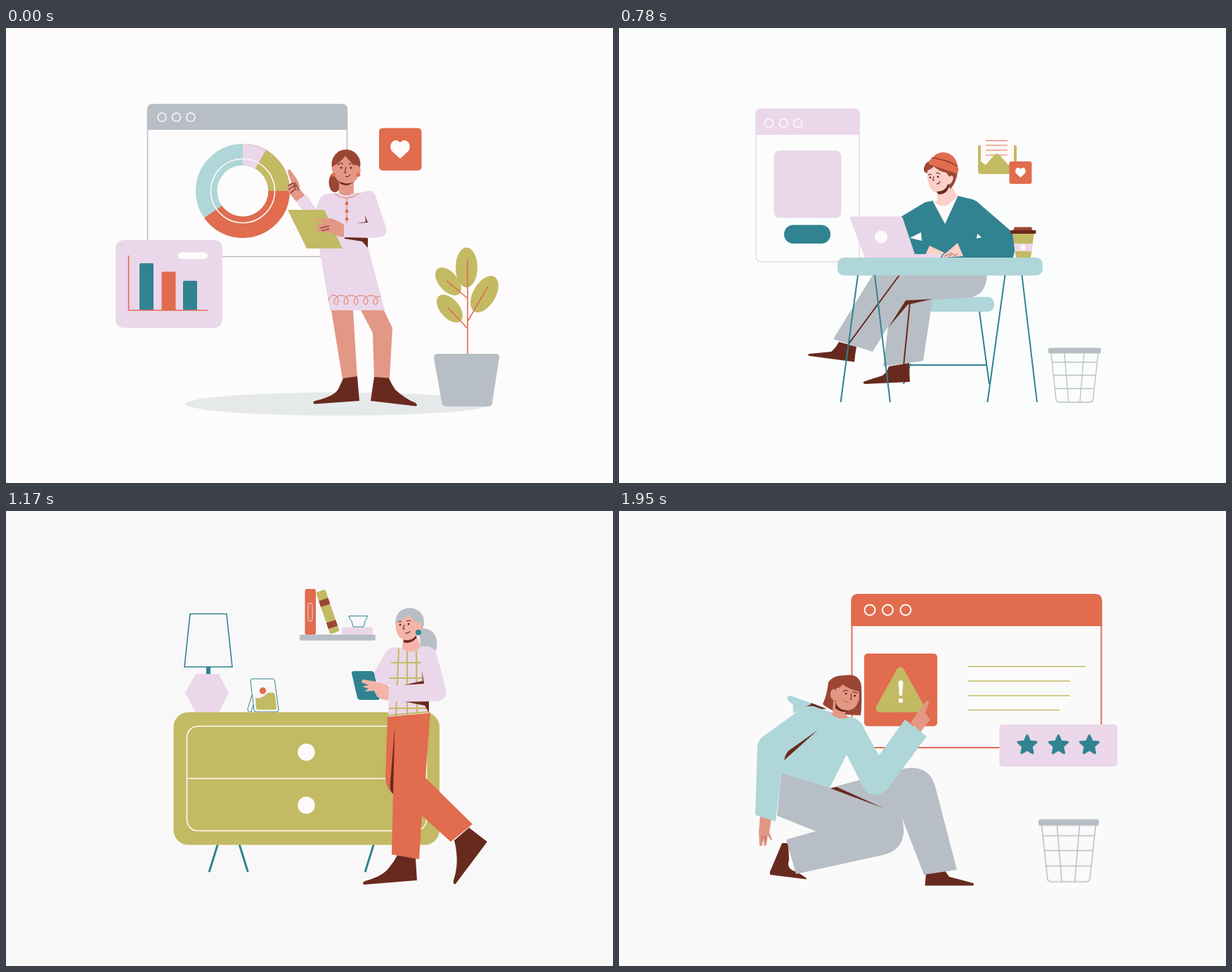
These frames come from a looping animation (864x648 px, 2.34 s). An HTML page:

```html
<!DOCTYPE html>
<html lang="en">
<head>
<meta charset="utf-8">
<title>People at work</title>
<style>
html, body { margin: 0; width: 100%; height: 100%; overflow: hidden; }
svg { display: block; width: 100vw; height: 100vh; animation: paper 2340ms step-end infinite; }
.scene { animation: show 2340ms step-end infinite; }
.s1 { animation-delay: -1950ms; }
.s2 { animation-delay: -1560ms; }
.s3 { animation-delay: -1170ms; }
.s4 { animation-delay: -780ms; }
.s5 { animation-delay: -390ms; }
@keyframes show { 0% { opacity: 1; } 16.666% { opacity: 0; } 100% { opacity: 0; } }
@keyframes paper {
  0% { background: #fdfbfc; }
  33.333% { background: #fbfdfd; }
  44.444% { background: #fdfdfd; }
  50% { background: #f9f8f9; }
  66.666% { background: #fcf8f8; }
  83.333% { background: #fafafa; }
  100% { background: #fdfbfc; }
}
.gray { fill: #b8bec6; } .teal { fill: #318391; } .aqua { fill: #afd6d8; }
.lilac { fill: #ebd7ea; } .coral { fill: #e16c4e; } .olive { fill: #c3ba64; }
.dark { fill: #682a1e; } .hair { fill: #9b4634; } .white { fill: #fefafa; }
.skin { fill: #e39785; } .fair { fill: #fad0c8; } .rose { fill: #f4b5a8; }
.l { fill: none; stroke-width: 1.6; }
.l.gray { stroke: #b8bec6; } .l.teal { stroke: #318391; } .l.aqua { stroke: #afd6d8; }
.l.lilac { stroke: #ebd7ea; } .l.coral { stroke: #e16c4e; } .l.olive { stroke: #c3ba64; }
.l.dark { stroke: #682a1e; stroke-width: 1.1; } .l.white { stroke: #fefafa; }
.l.gray, .l.teal, .l.aqua, .l.lilac, .l.coral, .l.olive, .l.dark, .l.white { fill: none; }
</style>
</head>
<body>
<svg viewBox="0 0 864 648" preserveAspectRatio="none">
<defs>
  <path id="heart" class="white" d="M0 13L-12 2C-16-3-13-13-6.5-13C-3-13-1-11 0-9.5C1-11 3-13 6.5-13C13-13 16-3 12 2Z"/>
  <path id="star" class="teal" stroke="#318391" stroke-width="3.5" stroke-linejoin="round" d="M0-13.5L3.6-5L12.8-4.2L5.9 1.9L7.9 10.9L0 6.2L-7.9 10.9L-5.9 1.9L-12.8-4.2L-3.6-5Z"/>
  <g id="bin">
    <path class="l gray" style="stroke-width:1.3" d="M615 463L622 528Q622 533 627 533H670Q674 533 675 528L682 463M634 463L640 533M662 463L656 533M617 476H680M618 494.5H678M620 513.5H676"/>
    <rect class="gray" x="611" y="455.5" width="75" height="8" rx="2.5"/>
  </g>
  <path id="slacks" d="M453 317L510 312L502 350Q500 364 505 372L554 459L519 477L497 442L493 499L453 492L456 398Q449 385 451 368Z"/>
  <clipPath id="legs"><use href="#slacks"/></clipPath>
</defs>

<g class="scene s0">
  <ellipse cx="474" cy="535.5" rx="219" ry="16.5" fill="#e6e9ea"/>
  <rect class="l gray" x="201.5" y="110" width="284" height="215.5" rx="7"/>
  <path class="gray" d="M201 145V116Q201 108 209 108H478Q486 108 486 116V145Z"/>
  <g class="l white"><circle cx="222" cy="127" r="6"/><circle cx="242.5" cy="127" r="6"/><circle cx="263" cy="127" r="6"/></g>
  <g fill="none" stroke-width="30.5" transform="rotate(-90 337 232)">
    <circle cx="337" cy="232" r="51.7" stroke="#afd6d8"/>
    <circle cx="337" cy="232" r="51.7" stroke="#e16c4e" pathLength="360" stroke-dasharray="235 125"/>
    <circle cx="337" cy="232" r="51.7" stroke="#c3ba64" pathLength="360" stroke-dasharray="90 270"/>
    <circle cx="337" cy="232" r="51.7" stroke="#ebd7ea" pathLength="360" stroke-dasharray="29.5 330.5"/>
  </g>
  <circle class="l white" cx="337" cy="232" r="45.5"/>
  <rect class="lilac" x="156" y="302" width="152" height="125" rx="12"/>
  <rect class="white" x="245" y="319.5" width="42" height="9.5" rx="4.7"/>
  <rect class="teal" x="190" y="335" width="20" height="67" rx="1.5"/>
  <rect class="coral" x="221.5" y="347" width="20" height="55" rx="1.5"/>
  <rect class="teal" x="252" y="360" width="20" height="42" rx="1.5"/>
  <path class="l coral" d="M174.5 324V402H287"/>
  <rect class="coral" x="531" y="142.5" width="60.5" height="60.5" rx="5"/>
  <use href="#heart" x="561" y="173"/>

  <g class="olive">
    <ellipse cx="655.5" cy="341" rx="15.5" ry="28.5"/>
    <ellipse cx="629.5" cy="361" rx="13.5" ry="23.5" transform="rotate(-41 629.5 361)"/>
    <ellipse cx="631.5" cy="399.5" rx="13.5" ry="23.5" transform="rotate(-41 631.5 399.5)"/>
    <ellipse cx="681" cy="379" rx="16" ry="28.6" transform="rotate(30 681 379)"/>
  </g>
  <path class="l coral" d="M657 464V329M657 385L627 360M657 428L629 398M657 418L686 368"/>
  <path class="gray" d="M614 464H697Q703 464 702 470L692 534Q691 539 686 539H627Q621 539 620.5 534L609 470Q609 464 614 464Z"/>

  <path class="skin" d="M463 402H494L500 498L479 500ZM505 402H538L550 427L546 499L524 498L522 434Z"/>
  <path class="dark" d="M480 499L500 496L503 531L439 535.5Q435 533 440 531Q470 524 474 512ZM524 497L545 498.500Q549 508 554 515Q568 528 583 534Q587 538 583 538.5L519 531Z"/>
  <path class="skin" d="M401 202Q404 200 407 205L415 217Q418 222 418 229L426 239L413 247L404 236Q399 231 401 226Q403 222 406 220L401.500 206Z"/>
  <path class="l dark" d="M401 225L409 221L412 226M402 230L410 225L413 231M405 235L411 230M411 220L417 231"/>
  <path class="lilac" d="M413 247L427 237L444 262H424Z"/>
  <ellipse class="hair" cx="468" cy="220" rx="8.500" ry="14"/>
  <path class="lilac" d="M453 237Q461 235 470 235H502L518 231.500Q523 232 526 239L541 284Q543 297 531 298L515 299L516 315L539 402H461L446 314L440 265Q445 240 453 237Z"/>
  <path class="skin" d="M474 214H495V235Q485 242 474 235Z"/>
  <path class="dark" d="M475 216Q485 224 495 215V219Q485 228 475 221Z"/>
  <ellipse class="hair" cx="484" cy="194" rx="20.500" ry="21"/>
  <path class="skin" d="M465 197Q477 191 483 182Q490 193 503 197Q507 204 502 209Q499 221 485 221.500Q470 220 467 208Q462 202 465 197Z"/>
  <g class="coral"><circle cx="466" cy="209" r="2.700"/><circle cx="501.500" cy="209" r="2.700"/><circle cx="485" cy="250" r="2.400"/><circle cx="485" cy="261" r="2.400"/><circle cx="485" cy="272" r="2.400"/></g>
  <path class="l coral" style="stroke-width:1" d="M468 236Q485 249 503 235M485 243V278"/>
  <circle class="dark" cx="477" cy="199" r="1.500"/><circle class="dark" cx="491" cy="199" r="1.500"/>
  <path class="l dark" d="M472 195Q476 191 480 194M488 194Q492 191 496 195M484 198L482 206H485M483 212Q488 212 490 209"/>
  <path class="dark" d="M498 278L512 276L511 267L515 277ZM482 298L515 299V313L507 304L482 300Z"/>
  <path class="olive" d="M401 259H453L479 314H428Z"/>
  <path class="skin" d="M441 273L463 271Q471 274 481 280V298Q468 296 462 291L446 290Q439 288 444 284Q439 282 445 279L456 277L442 275Z"/>
  <path class="l dark" d="M447 285L460 282M449 289L460 286"/>
  <path class="l coral" style="stroke-width:1" d="M459 388c3-11 14-9 14 1c0 6-6 6-6 1c0-3 3-8 8-9c8-1 12 4 12 8c0 6-6 6-6 1c0-3 3-8 8-9c8-1 12 4 12 8c0 6-6 6-6 1c0-3 3-8 8-9c8-1 12 4 12 8c0 6-6 6-6 1c0-3 3-8 8-9c8-1 12 4 12 8c0 6-6 6-6 1c0-5 5-8 10-8"/>
</g>

<g class="scene s1">
  <rect class="l aqua" style="stroke-width:2" x="195.500" y="114" width="365.500" height="224" rx="9"/>
  <path class="aqua" d="M194.500 160V122Q194.500 112 204 112H552Q562 112 562 122V160Z"/>
  <g class="l white" style="stroke-width:2.1"><circle cx="222" cy="136" r="7.600"/><circle cx="248.500" cy="136" r="7.600"/><circle cx="274.500" cy="136" r="7.600"/></g>
  <rect class="aqua" x="213.500" y="199.500" width="107.500" height="107" rx="9"/>
  <path class="teal" d="M408 230.500V287.500H352Q345.500 287.500 345.500 281V237Q345.500 230.500 352 230.500ZM410 230.500H469.500V287.500H410Z"/>
  <path class="lilac" d="M472 230.500H527Q534 230.500 534 237V281Q534 287.500 527 287.500H472Z"/>
  <circle class="olive" cx="206" cy="329" r="34"/>
  <path class="l white" d="M192 331L205 340L223 318"/>
  <path class="olive" d="M652 341C662 343 680 355 680 375C676 390 691 395 691 414C691 425 686 435 683 441H620C617 435 612 425 612 414C612 395 627 390 624 375C624 355 642 343 652 341Z"/>
  <path class="l coral" d="M652 440V367M652 391L639 377M652 411L662 391"/>
  <path class="l coral" style="fill:#fefcfd" d="M615 440.500H688Q692 440.500 691.500 445L683 530Q682 534 678 534H627Q623 534 622 530L611.500 445Q611.500 440.500 615 440.500Z"/>

  <path class="dark" d="M465 494L490 498L492 530L417 535Q414 533 419 530Q450 518 455 510Q460 500 465 494ZM527 476L551 461L572 485L515 532Q511 533 513 527Q532 500 527 476Z"/>
  <use href="#slacks" class="lilac"/>
  <g class="olive" clip-path="url(#legs)">
    <circle cx="467" cy="330" r="18.500"/><circle cx="496" cy="369" r="20.500"/><circle cx="476" cy="419" r="20"/>
    <circle cx="456" cy="396" r="18"/><circle cx="488" cy="443" r="20.500"/><circle cx="530" cy="431" r="20.500"/><circle cx="451" cy="481" r="18.500"/>
    <path d="M503 312H511L506 355H499Z"/>
  </g>
  <path class="skin" d="M419 165Q421 163.500 424 167L433 181Q437 185 437 192L444 201L431 211L425 198Q416 193 418 187Q420 183 424 181L419 168Z"/>
  <path class="l dark" d="M418 189L427 184H433M420 194L428 187L432 190M425 197L430 191L434 199"/>
  <path class="dark" d="M463 230H472L470 300L460 317H451L457 290L455 255ZM485 212L496 208L490 226Z"/>
  <path class="coral" d="M430 211L446 199L468 233L456 257Z"/>
  <path class="skin" d="M491 210L505 203L511 221L488 228Z"/>
  <path class="coral" d="M488 223Q503 224 509 220Q518 225 516 240L507 285L511 311L459 317L471 300Q455 303 449 292Q446 285 450 279L457 268L470 235Z"/>
  <path class="l dark" d="M490 236L462 266M507 261L470 301"/>
  <circle class="hair" cx="519" cy="194" r="14.500"/>
  <path class="skin" d="M479 183Q475 192 476 198L472.500 204L476 206Q476 215 486 216Q496 214 503 207L507 192L490 176Z"/>
  <path class="hair" d="M477 186Q482 167 498 167Q513 168 516 184Q515 203 505 211L506 200Q506 191 499 193Q495 194 495 199Q486 190 484 180Q480 182 477 186Z"/>
  <ellipse class="skin" cx="500.500" cy="199" rx="5.500" ry="6"/>
  <circle class="dark" cx="478" cy="193" r="1.600"/>
  <path class="l dark" d="M476 189Q479 186 482 189M475 211Q479 212 480 209"/>
</g>

<g class="scene s2">
  <rect class="l lilac" x="195" y="116" width="147" height="217" rx="7"/>
  <path class="lilac" d="M194 152V122Q194 114.500 202 114.500H335Q343 114.500 343 122V152Z"/>
  <g class="l white"><circle cx="213.500" cy="135.500" r="6"/><circle cx="234" cy="135.500" r="6"/><circle cx="254.500" cy="135.500" r="6"/></g>
  <rect class="lilac" x="220.500" y="174.500" width="96" height="96" rx="8"/>
  <rect class="teal" x="235" y="280.500" width="66" height="26.500" rx="13"/>
  <rect class="white" x="515" y="149" width="47" height="46" rx="2"/>
  <path class="l coral" style="stroke-width:1" d="M522 160.500H553M522 167H553M522 174H553M522 181H553"/>
  <path class="olive" d="M511 169Q512 166 515 167V190L522 195L534 181Q538 177 542 181L554 195L562 190V167Q566 166 566 169V204Q566 208 562 208H515Q511 208 511 204Z"/>
  <rect class="coral" x="555.500" y="190" width="32" height="32" rx="3"/>
  <use href="#heart" transform="translate(571.5 206) scale(.53)"/>

  <rect class="aqua" x="400" y="383" width="134" height="21" rx="9"/>
  <path class="l teal" style="stroke-width:2" d="M513 404L527 507M414 480H523M415 478L405 507"/>
  <path class="dark" d="M313 447L338 454Q336 465 335 475.500L271 467Q267 465 271 464L302 461Q309 455 313 447ZM384 482L413 477L414 504L350 507Q345 505 350 503L375 495Q382 490 384 482Z"/>
  <path class="gray" d="M362 350H524Q523 382 497 384L446 387L433 474L376 482L383 425L361 461L305 443Z"/>
  <path class="dark" d="M446 386L408 388L383 427L411 394Z"/>
  <path class="l dark" style="stroke-width:2" d="M399 352L326 451M414 392L405 482"/>

  <path class="teal" d="M447 246L464 278L482 239L503 244Q509 246 515 252L560 291Q567 310 561 327H420L405 300L401 269L436 248Z"/>
  <path class="white" d="M414 299L430 291L431 303ZM510 293L516 298L509 300ZM447 247L464 279L482 240Z"/>
  <path class="fair" d="M453 232L472 222L482 240L468 252Q458 256 449 248L453 246Z"/>
  <path class="hair" d="M434 204Q433 192 443 189L482 205Q480 220 472 229L466 222Q448 198 445 203L438 207Z"/>
  <path class="fair" d="M439 203Q446 200 448 197Q455 204 466 206L470 212Q474 208 476 213Q475 221 469 223Q465 234 455 235Q446 235 442 226Q438 215 439 203Z"/>
  <path class="dark" d="M452 233Q465 233 468 222L470 225Q467 237 455 237Z"/>
  <path class="coral" d="M446 185Q452 177 462 177Q480 179 482 198L483 200Q484 204 481 207.500L441 194Q440 189 446 185Z"/>
  <path class="l dark" d="M445 185Q466 187 482 197M440 210Q442 207 445 209M451 207Q454 205 457 208M448 211L447 217H449M452 222Q456 222 457 218"/>
  <circle class="dark" cx="443" cy="213" r="1.400"/><circle class="dark" cx="454" cy="212" r="1.400"/>
  <path class="fair" d="M442 310L463 320L456 327L436 323ZM482 306L490 325L460 327Q460 323 466 320Z"/>
  <path class="l dark" style="stroke-width:.7" d="M463 325L474 320M469 325L477 321M476 325L482 322"/>
  <path class="lilac" d="M332 268.500H400Q403 268.500 404 271L421 322H456Q460 324 458 327H350L329 272Q328 268.500 332 268.500Z"/>
  <circle class="white" cx="373" cy="297.500" r="9"/>
  <rect class="aqua" x="311" y="327" width="292" height="25.500" rx="9"/>
  <path class="l teal" style="stroke-width:2" d="M340 352L315.500 533M364 352L386 533M549.500 352L524.500 533M573.500 352L595 533"/>
  <path class="hair" d="M563 283.500H587L589 289H561Z"/>
  <path class="olive" d="M560 292H591L586 327H565Z"/>
  <path class="lilac" d="M562 307H589L587.500 318H563.500Z"/>
  <circle class="white" cx="575" cy="312.500" r="3.700"/>
  <rect class="dark" x="557" y="288" width="36.500" height="5" rx="1"/>
  <use href="#bin"/>
</g>

<g class="scene s3">
  <path class="l teal" d="M262 146.500H314L322 222H254Z"/>
  <path class="teal" d="M285 222H291V233H285Z"/>
  <path class="lilac" d="M270 232H303L317 259L303 287H270L255 259Z"/>
  <path class="l teal" style="stroke-width:1" d="M351 239H380Q382 239 382.500 242L388 283Q388 286 385 286H356Q353 286 353 283L348 242Q348 239 351 239ZM350 262L344 282Q344 287 349 286L352 276"/>
  <circle class="coral" cx="365.500" cy="256" r="4.700"/>
  <path class="olive" d="M355 266Q361 268 368 263Q372 257 381 259Q383 259 384 270L385 280Q385 283 382 283H359Q356 283 356 280Z"/>
  <rect class="coral" x="425.500" y="111" width="15.500" height="65" rx="3"/>
  <rect class="l lilac" style="stroke-width:1" x="430" y="131" width="6" height="26" rx="3"/>
  <g transform="translate(441 116) rotate(-19)">
    <rect class="olive" width="14" height="63" rx="2.500"/>
    <path class="hair" d="M0 13H14V22H0ZM0 46H14V55H0Z"/>
  </g>
  <rect class="lilac" x="478" y="165.500" width="44" height="11" rx="3"/>
  <path class="l teal" style="stroke-width:1" d="M488 149.500H514.500Q513 155 511 157L509 165H494L492 157Q489 155 488 149.500Z"/>
  <rect class="gray" x="418" y="176" width="108" height="8.500" rx="2.500"/>
  <path class="l teal" style="stroke-width:3" stroke-linecap="round" d="M301 476L289.500 513M332.500 476L344 513M523 476L511.500 513"/>
  <rect class="olive" x="238.500" y="286.500" width="378.500" height="189" rx="21"/>
  <rect class="l white" x="257.500" y="306.500" width="341" height="149" rx="16"/>
  <path class="l white" d="M258 381H598"/>
  <circle class="white" cx="427.500" cy="343.500" r="12.200"/><circle class="white" cx="427.500" cy="419" r="12.200"/>

  <path class="dark" d="M557 490L583 494L585 526L510 532Q505 531 511 527Q537 520 546 507Q552 500 557 490ZM638 469L659 451L685 471L640 531Q636 533 637 526Q646 500 638 469Z"/>
  <path class="coral" d="M543 293L604 287L597 380L664 446L633 471L592 434L588 496L549 489L551 402Q541 396 540 380Z"/>
  <path class="dark" d="M553.500 306L551 403Q546 400 547 387Z"/>
  <path class="gray" d="M588 167Q607 166 612 180Q615 190 612 199L590 196Z"/>
  <path class="lilac" d="M564 195L552 194Q545 195 540 202L524 230Q522 237 530 243L545 254L544 293L602 288L604 194H590Q577 204 564 195Z"/>
  <path class="l olive" style="stroke-width:2.200" d="M559 196L555 292M571 200V291M584 199L585 290M548 216H591M546 238H594M545 281H602M544 291L602 286"/>
  <path class="dark" d="M552 251L598 250L592 228L593 242ZM560 270H602V287L596 277Z"/>
  <path class="lilac" d="M588 193L602 192.500Q611 195 614 208L626 253Q628 270 613 271L545 272L546 249L595 246L592 226Z"/>
  <path class="rose" d="M565 180L584 174L590 194Q577 206 564 196Z"/>
  <path class="dark" d="M566 182Q578 185 584 175V181Q576 190 566 187Z"/>
  <path class="gray" d="M554 162Q554 139 575 138Q594 140 595 158Q595 168 588 174L576 160Z"/>
  <path class="rose" d="M555 158Q567 156 574 147Q580 158 591 160Q594 170 586 174Q580 185 569 184Q553 181 555 158Z"/>
  <circle class="teal" cx="587" cy="173" r="4"/>
  <circle class="dark" cx="561" cy="162" r="1.400"/><circle class="dark" cx="573" cy="161" r="1.400"/>
  <path class="l dark" d="M558 158Q561 156 563 158M570 157Q573 155 576 157M567 162L565 168H568M568 174Q574 174 575 171"/>
  <path class="teal" d="M495 228H520Q523 228 524 231L532 266Q532 269 529 269H505Q501 269 500 266L492 231Q492 228 495 228Z"/>
  <path class="rose" d="M507 240L521 242Q532 243 546 250L544 270Q534 269 528 264L524 256L510 257L516 253L507 250L516 248L506 244Z"/>
  <circle class="white" cx="546" cy="249" r="1.500"/>
</g>

<g class="scene s4">
  <rect class="l gray" x="235.500" y="159" width="336.500" height="256.500" rx="8"/>
  <path class="gray" style="fill:#b8bcc8" d="M234.500 201V167Q234.500 157 244 157H563Q573 157 573 167V201Z"/>
  <g class="l white" style="stroke-width:2"><circle cx="260" cy="179.500" r="7"/><circle cx="284" cy="179.500" r="7"/><circle cx="308" cy="179.500" r="7"/></g>
  <rect class="lilac" x="194" y="276.500" width="126.500" height="169" rx="8"/>
  <circle class="teal" cx="257" cy="339" r="36.500"/>
  <circle class="white" cx="257.500" cy="325" r="14"/>
  <path class="white" d="M228 361Q236 342 257.500 342Q280 342 286.500 361A36.500 36.500 0 0 1 228 361Z"/>
  <path class="l teal" style="stroke-width:1.200" d="M214 392.500H301M214 403.500H301M224 414.500H291"/>
  <circle class="l coral" style="stroke-width:2.600" cx="296" cy="346" r="26.200"/>
  <path class="l coral" style="stroke-width:2.600" d="M315 363L329 376"/>
  <path class="l olive" style="stroke-width:10" stroke-linecap="round" d="M331 377L348.500 394"/>
  <rect class="teal" x="472" y="238" width="196" height="47.500" rx="6"/>
  <text class="aqua" x="498" y="269" text-anchor="middle" font-family="Lato, sans-serif" font-weight="700" font-size="26">@</text>
  <path class="l aqua" style="stroke-width:1.300" d="M526 253.500H647M526 262H647M526 270.500H647"/>
  <path class="l olive" style="stroke-width:1.400" d="M672 402Q675 430 681 441M691 402Q684 425 682 441"/>
  <g class="olive">
    <ellipse cx="676" cy="429" rx="4.500" ry="2.500" transform="rotate(35 676 429)"/>
    <ellipse cx="684" cy="409" rx="4.500" ry="2.500" transform="rotate(55 684 409)"/>
    <ellipse cx="690" cy="415" rx="4.500" ry="2.500" transform="rotate(-35 690 415)"/>
    <ellipse cx="686" cy="425" rx="4.500" ry="2.500" transform="rotate(-35 686 425)"/>
  </g>
  <path class="lilac" d="M664 390L669 392L672 389L675 392L680 391Q680 403 672 404Q664 402 664 390ZM684 390L689 392L692 389L695 392L700 391Q699 403 691 404Q684 402 684 390Z"/>
  <g class="aqua"><rect x="668" y="441" width="25" height="7" rx="2"/><rect x="674" y="446" width="14" height="7"/><rect x="663" y="451.500" width="36" height="45" rx="3"/></g>

  <path class="skin" d="M336 257Q339 256 342 260L357 281Q362 285 361 296L374 311L356 329L347 311Q333 308 333 302Q331 296 337 293Q337 287 345 284L335 261Z"/>
  <path class="l dark" d="M334 297L341 291L346 295M337 304L345 296L349 302M344 309L350 300M343 286L350 291L358 290"/>
  <path class="coral" d="M366 427.500H446Q450 427.500 452 431L472 488H527Q531 492 527 496.500H391Q387 496.500 386 493L362 432Q361 427.500 366 427.500Z"/>
  <path class="skin" d="M473 489L515 478L536 494L527 489Z"/>
  <path class="teal" d="M355 329L373 311L429 358L505 357L583 352.500Q598 354 603 366L642 455Q650 486 625 489L535 495L516 479L473 489L482 402H425Q414 401 407 393Z"/>
  <path class="l aqua" style="stroke-width:1" d="M521.500 373V473"/>
  <path class="dark" d="M578 418L594 457L521 475L587 453Z"/>
  <path class="lilac" d="M506 355L497 367L501 379L510 371L514 377L522 373ZM556 354L554 373L542 371L541 379L522 373L546 356Z"/>
  <path class="skin" d="M514 336L544 326L546 358Q534 374 522 374Q513 368 508 356L514 358Z"/>
  <path class="dark" d="M514 338Q535 340 543 323L544 331Q536 345 514 344Z"/>
  <path class="hair" d="M498 303Q499 272 529 270.500Q556 273 559 300Q560 315 552 323L545 333L540 310Z"/>
  <path class="skin" d="M499 301Q517 299 529 293Q541 297 543 308Q548 300 553 305Q555 320 543 326Q538 338 522 339.500Q506 339 501 328Q498 315 499 301Z"/>
  <circle class="dark" cx="508" cy="309" r="1.700"/><circle class="dark" cx="524" cy="308.500" r="1.700"/>
  <path class="l dark" d="M503 305Q507 301 511 304M520 303Q525 301 528 305M515 308L513 317H516"/>
  <path class="l coral" d="M518 324Q524 325 526 320"/>
</g>

<g class="scene s5">
  <rect class="l coral" style="stroke-width:2" x="331.500" y="120" width="355" height="217" rx="8"/>
  <path class="coral" d="M330.500 164V128Q330.500 118 340 118H678Q687.500 118 687.500 128V164Z"/>
  <g class="l white" style="stroke-width:2"><circle cx="357" cy="141" r="7.500"/><circle cx="382.500" cy="141" r="7.500"/><circle cx="408" cy="141" r="7.500"/></g>
  <rect class="coral" x="349" y="203" width="104" height="103.500" rx="5"/>
  <path class="olive" stroke="#c3ba64" stroke-width="11" stroke-linejoin="round" d="M400.500 228L430 281H371Z"/>
  <path class="white" d="M397.500 244Q401 238 404.500 244L403 263H399Z"/><circle class="white" cx="401" cy="270" r="3.300"/>
  <path class="l olive" style="stroke-width:1.500" d="M497 221.500H664M497 242.300H642M497 263H642M497 283.500H627"/>
  <rect class="lilac" x="541.500" y="304" width="168" height="60" rx="5"/>
  <use href="#star" x="581" y="333.500"/><use href="#star" x="625.500" y="333.500"/><use href="#star" x="669.500" y="333.500"/>
  <use href="#bin" transform="translate(-103.8 -83.4) scale(1.147)"/>

  <path class="dark" d="M232 473H241L242 497Q238 509 250 513Q268 522 267 524.500L215 518Q214 514 217 509ZM437 516L463 511L470 521Q490 526 504 530Q507 533 503 533.500H435.500Z"/>
  <path class="gray" d="M231 373L302 394L343 383L405 367Q441 360 450 392L481 511L434 518L402 435Q408 455 403 468Q398 483 380 489L252 517L238 468L280 456L225 434Z"/>
  <path class="dark" d="M301 395L376 423L310 393Z"/>
  <path class="skin" d="M201 433L217 438L214 457L218 468Q216 471 212 462L210 475L207 478L205 465L204 477L200 477L199 456Z"/>
  <path class="l dark" style="stroke-width:.6" d="M204 463V471M208 463V470"/>
  <path class="skin" d="M415 301L427 285L437 271Q441 268 441 273L436 288L443 297L429 315Z"/>
  <path class="dark" d="M249 290L273 273L296 282L270 282Z"/>
  <path class="aqua" d="M240 264Q246 262 252 266L275 274L249 288Q247 285 248 276Q238 270 240 264Z"/>
  <path class="hair" d="M298 244Q305 233 322 234Q343 231 345 250Q346 275 344 291L322 290L308 286Q295 280 290 275Q296 262 298 244Z"/>
  <path class="aqua" d="M277 278L300 286Q315 298 330 293Q345 297 350 312L370 348L407 297L438 321L382 396Q366 411 350 398L324 347L300 394L231 373L223 442L194 433L197 335Q198 325 208 319L262 280Q270 277 277 278Z"/>
  <path class="skin" d="M305 270L323 280L322 290L328 294Q311 300 299 286L304 288Z"/>
  <path class="dark" d="M308 273Q314 286 328 283Q320 290 308 281Z"/>
  <path class="skin" d="M309 252Q315 253 318 247Q328 254 341 257Q344 268 338 277Q333 284 325 284Q312 283 309 271Q300 269 301 259Q304 250 309 256Z"/>
  <circle class="dark" cx="323" cy="260" r="1.500"/><circle class="dark" cx="335.500" cy="263" r="1.500"/>
  <path class="l dark" d="M319 257Q323 253 326 257M332 258Q336 257 339 260M330 260L331 268H328"/>
  <path class="l coral" d="M320 269Q322 273 327 272"/>
  <path class="dark" d="M283 312L235 355Q237 345 242 341Z"/>
</g>
</svg>
</body>
</html>
```
